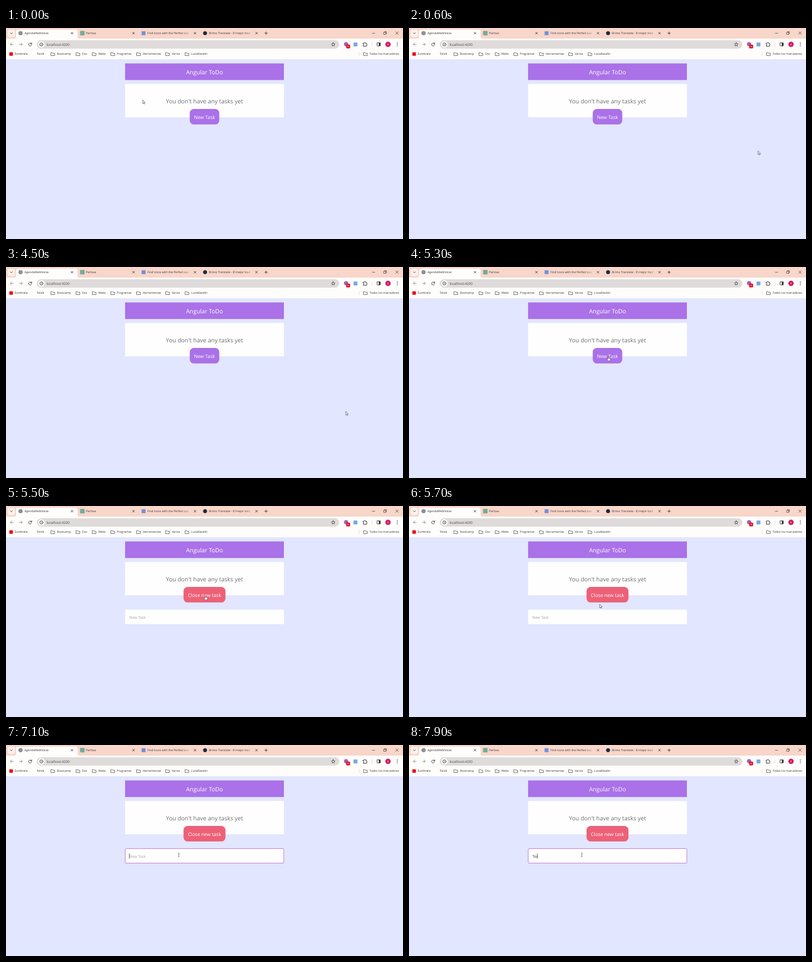
These frames come from a looping animation (710x378 px, 8000 ms). An HTML page:

```html
<!DOCTYPE html>
<html lang="es">
<head>
<meta charset="utf-8">
<title>Task list demo</title>
<style>
html, body { margin: 0; width: 100%; height: 100%; overflow: hidden; background: #e2e6fe; }
svg { display: block; width: 710px; height: 378px; }
text { font-family: "Open Sans", "Noto Sans", sans-serif; text-rendering: geometricPrecision; white-space: pre; }
.ui text { font-size: 5.2px; fill: #333336; }
.ui .url { font-size: 6.15px; fill: #4a4546; }
.line { fill: none; stroke: #353538; stroke-width: .9; stroke-linecap: round; stroke-linejoin: round; }
.dim { stroke: #8f8b8c; }
.big { font-size: 10.5px; text-anchor: middle; }
.label { font-size: 8.65px; fill: #fff; text-anchor: middle; }
.field { font-size: 6.7px; }

/* One 8 s timeline: 1.25% is 100 ms */
.anim, .anim * { animation: 8s step-end infinite; }
.closed { animation-name: closed; }
.open { animation-name: open; }
.ring { animation-name: ring; }
.hint { animation-name: hint; }
.caret { animation-name: blink, caret; }
.k1 { animation-name: key1; }
.k2 { animation-name: key2; }
.k3 { animation-name: key3; }
.cursor { animation-name: move; }
.arrow { animation-name: arrow; }
.hand { animation-name: hand; }
.beam { animation-name: beam; }

@keyframes closed { 0% { visibility: visible } 68.75%, 100% { visibility: hidden } }
@keyframes open { 0% { visibility: hidden } 68.75%, 100% { visibility: visible } }
@keyframes ring {
  0% { visibility: hidden; stroke: #d9b3e2 }
  76.25% { visibility: visible; stroke: #d9b3e2 }
  77.5% { visibility: visible; stroke: #c37fd2 }
  78.75%, 100% { visibility: visible; stroke: #b45fc6 }
}
@keyframes hint { 0% { visibility: hidden } 68.75% { visibility: visible } 95%, 100% { visibility: hidden } }
@keyframes blink {
  0% { visibility: hidden } 76.25% { visibility: visible }
  82.5% { visibility: hidden } 88.75%, 100% { visibility: visible }
}
@keyframes caret {
  0% { transform: none } 95% { transform: translateX(3.6px) }
  96.25% { transform: translateX(6.9px) } 98.75%, 100% { transform: translateX(9.5px) }
}
@keyframes key1 { 0% { visibility: hidden } 95%, 100% { visibility: visible } }
@keyframes key2 { 0% { visibility: hidden } 96.25%, 100% { visibility: visible } }
@keyframes key3 { 0% { visibility: hidden } 98.75%, 100% { visibility: visible } }
@keyframes move {
  0% { transform: translate(244.5px, 129px) }
  1.25% { transform: translate(302px, 135px) }
  2.5% { transform: translate(351px, 140.5px) }
  6.25% { transform: translate(500px, 184px) }
  7.5% { transform: translate(624.3px, 220.3px) }
  32.5% { transform: translate(628.4px, 257.8px) }
  56.25% { transform: translate(607.7px, 258.8px) }
  62.5% { transform: translate(548px, 238px) }
  63.75% { transform: translate(462px, 204px) }
  65% { transform: translate(388px, 174px) }
  66.25% { transform: translate(356.3px, 160.4px) }
  70% { transform: translate(353px, 165px) }
  71.25% { transform: translate(341px, 176px) }
  72.5% { transform: translate(323px, 190px) }
  73.75% { transform: translate(313.2px, 195px) }
  75% { transform: translate(310px, 196.3px) }
  76.25%, 100% { transform: translate(309px, 196.8px) }
}
@keyframes arrow {
  0% { visibility: visible } 66.25% { visibility: hidden }
  71.25% { visibility: visible } 72.5%, 100% { visibility: hidden }
}
@keyframes hand { 0% { visibility: hidden } 66.25% { visibility: visible } 71.25%, 100% { visibility: hidden } }
@keyframes beam { 0% { visibility: hidden } 72.5%, 100% { visibility: visible } }
</style>
</head>
<body>
<svg viewBox="0 0 710 378" xmlns="http://www.w3.org/2000/svg">
  <defs>
    <linearGradient id="fade">
      <stop offset="0" stop-color="#f8d6ca" stop-opacity="0"/>
      <stop offset=".7" stop-color="#f8d6ca"/>
    </linearGradient>
    <path id="x" class="line" d="M-1.7-1.7L1.7 1.7M1.7-1.7L-1.7 1.7"/>
    <path id="folder" class="line" d="M.6 44.2H3l.9 1H7v4.2H.6z" style="stroke-width:.7"/>
    <path id="back" class="line dim" d="M2.7 0H-2.7M-.2-2.6L-2.8 0L-.2 2.6"/>
  </defs>

  <!-- Browser window -->
  <g class="ui">
    <rect width="710" height="20" fill="#f8d6ca"/>
    <rect y="19" width="710" height="37" fill="#fffdfc"/>
    <path d="M14 19.2q4 0 4-4V7q0-4 4-4H124q4 0 4 4v8.2q0 4 4 4z" fill="#fffdfc"/>
    <rect x="3" y="3" width="13" height="13" rx="4" fill="#fdf1ec"/>
    <path class="line" d="M7.8 8.6l1.8 1.8l1.8-1.8"/>

    <circle cx="26" cy="9.2" r="3.8" fill="#8d9095"/>
    <text x="33" y="11.3">AgendaWebNotas</text>
    <rect x="132.5" y="5.2" width="8" height="8" rx="1" fill="#72ab9c"/>
    <text x="143" y="11.3">Parlova</text>
    <rect x="242.5" y="5.8" width="7" height="7" fill="#6f91dc"/>
    <text x="253" y="11.3">Find Icons with the Perfect Loo</text>
    <circle cx="356" cy="9.2" r="3.5" fill="#142c46"/>
    <text x="363" y="11.3">Brimo Translate - El mejor trad</text>
    <rect x="319" y="4" width="15" height="11" fill="url(#fade)"/>
    <rect x="429" y="4" width="16" height="11" fill="url(#fade)"/>
    <use href="#x" x="118" y="9.3"/>
    <use href="#x" x="228" y="9.3"/>
    <use href="#x" x="338" y="9.3"/>
    <use href="#x" x="448" y="9.3"/>
    <path class="line" d="M462.7 9.3h4.8M465.1 6.9v4.8"/>

    <g style="stroke-width:.7">
      <path class="line" style="stroke-width:.7" d="M655 9.4h4.6M675.8 7.7h3.4v3.7h-3.4zM676.9 7.5V6.6h3.4v3.7h-.9"/>
      <path class="line" style="stroke-width:.75" d="M697 6.8l4.6 4.6M701.6 6.8L697 11.4"/>
    </g>

    <use href="#back" x="10.5" y="29.3"/>
    <use href="#back" transform="translate(26.5 29.3) scale(-1 1)"/>
    <path class="line" d="M45.6 28.2A2.7 2.7 0 1 0 45.9 30.1M46 26.4v2.1h-2.1"/>
    <rect x="55" y="22" width="541" height="15" rx="7.5" fill="#dfdbdb"/>
    <circle cx="63.3" cy="29.5" r="5.6" fill="#fffdfc"/>
    <circle class="line" cx="63.3" cy="29.5" r="2.9"/>
    <path class="line" style="stroke-width:.8" d="M63.3 29.3v1.4M63.3 28v.05"/>
    <text class="url" x="72.4" y="31.7">localhost:4200</text>
    <path class="line" style="stroke-width:.75" d="M585.2 26.2l.95 2.1l2.25.25l-1.7 1.5l.5 2.25l-2-1.15l-2 1.15l.5-2.25l-1.7-1.5l2.25-.25z"/>

    <circle cx="608.2" cy="29" r="3.8" fill="#a45db8"/>
    <rect x="608.4" y="29.8" width="7" height="6.6" rx="1.5" fill="#e00f1f"/>
    <path d="M610.8 32l1.1 2l1.1-2" fill="none" stroke="#fff" stroke-width=".7"/>
    <rect x="621.5" y="26" width="7" height="7" rx=".8" fill="#78a8e2"/>
    <path class="line" style="stroke-width:1" d="M639 27.2h1.8q0-1.3 1-1.3t1 1.3h1.9v1.9q1.2 0 1.2 1t-1.2 1v1.7H639v-1.7q1.1 0 1.1-1T639 29z"/>
    <path d="M654.5 25.5v8" stroke="#f3d5cb" stroke-width=".9"/>
    <rect class="line" x="663.6" y="26.5" width="5.8" height="5.6" rx=".5"/>
    <rect x="666.7" y="26.5" width="2.8" height="5.6" fill="#353538"/>
    <circle cx="683.2" cy="29.3" r="4.8" fill="#d51a61"/>
    <text x="683.2" y="31" text-anchor="middle" style="font-size:4.6px;fill:#fff">A</text>
    <g fill="#353538">
      <circle cx="699.8" cy="26.6" r=".8"/><circle cx="699.8" cy="29.3" r=".8"/><circle cx="699.8" cy="32" r=".8"/>
    </g>

    <rect x="6" y="43.4" width="6.4" height="6.4" rx="1" fill="#f00a14"/>
    <text x="15.3" y="48.4">Zumbrela</text>
    <text x="54.7" y="48.4">Tolvik</text>
    <use href="#folder" x="80"/><text x="91.3" y="48.4">Bootcamp</text>
    <use href="#folder" x="125"/><text x="136" y="48.4">Doc</text>
    <use href="#folder" x="154"/><text x="165.3" y="48.4">Webs</text>
    <use href="#folder" x="187.3"/><text x="198.3" y="48.4">Programas</text>
    <use href="#folder" x="233.3"/><text x="244.4" y="48.4">Herramientas</text>
    <use href="#folder" x="285.3"/><text x="296.4" y="48.4">Varios</text>
    <use href="#folder" x="320"/><text x="331" y="48.4">LunaRavelin</text>
    <path d="M631.4 42.5v8" stroke="#f3d5cb" stroke-width=".9"/>
    <use href="#folder" x="639.2"/><text x="650.3" y="48.4">Todos los marcadores</text>
  </g>

  <!-- Page -->
  <rect y="56" width="710" height="322" fill="#e2e6fe"/>
  <rect x="213" y="63.5" width="284" height="29.7" fill="#aa71e8"/>
  <text class="big" x="355" y="82.7" fill="#fff">Angular ToDo</text>
  <rect x="213" y="100.3" width="284" height="59.7" fill="#fefefe"/>
  <text class="big" x="355" y="134.6" fill="#6c6d71">You don't have any tasks yet</text>

  <g class="anim">
    <g class="closed">
      <rect class="closed" x="328.6" y="145" width="52.8" height="27.8" rx="7.4" fill="#aa71e8"/>
      <text class="label closed" x="355" y="162.5">New Task</text>
    </g>
    <g class="open">
      <rect class="open" x="317.5" y="145" width="75" height="27.8" rx="7.4" fill="#ec6177"/>
      <text class="label open" x="355" y="162.5">Close new task</text>
      <rect class="open" x="213" y="185.7" width="284" height="26" fill="#fefefe"/>
      <rect class="ring" x="213.2" y="185.6" width="283.6" height="26" rx="1.4" fill="none" stroke-width=".8"/>
      <text class="field hint" x="220.6" y="201.5" fill="#a0a1a5">New Task</text>
      <text class="field" x="220.6" y="201.5" fill="#3c3d40"><tspan class="k1">T</tspan><tspan class="k2">e</tspan><tspan class="k3">r</tspan></text>
      <rect class="caret" x="220.3" y="194" width=".7" height="9.6" fill="#333"/>
    </g>

    <g class="cursor">
      <path class="arrow" d="M0 0V6.4L1.5 5.1L2.4 7.2L3.4 6.8L2.5 4.7H4.4z" fill="#fff" stroke="#2b2b30" stroke-width=".6" stroke-linejoin="round"/>
      <path class="hand" d="M-.7.7Q-.7 0 0 0T.7.7V3.1Q1.5 2.6 1.9 3.4Q2.7 3 3.1 3.8Q4 3.6 4 4.5V5.8Q4 7.9 1.6 7.9Q-.2 7.9-1-6.5Q-1 7-2.6 4.9Q-2.7 3.8-1.6 4.1L-.7 5z" visibility="hidden" style="d:path('M-.7 .7Q-.7 0 0 0T.7 .7V3.1Q1.5 2.6 1.9 3.4Q2.7 3 3.1 3.8Q4 3.6 4 4.5V5.8Q4 7.9 1.6 7.9Q-.2 7.9 -1 6.8L-2.6 4.9Q-2.7 3.8 -1.6 4.1L-.7 5z')" fill="#fff" stroke="#2b2b30" stroke-width=".6"/>
      <path class="beam" d="M-1.4-3.2H-.5Q0-3.2 0-2.7Q0-3.2.5-3.2H1.4M0-2.7V2.7M-1.4 3.2H-.5Q0 3.2 0 2.7Q0 3.2.5 3.2H1.4" fill="none" stroke="#4a4a4e" stroke-width=".7"/>
    </g>
  </g>
</svg>
</body>
</html>
```
